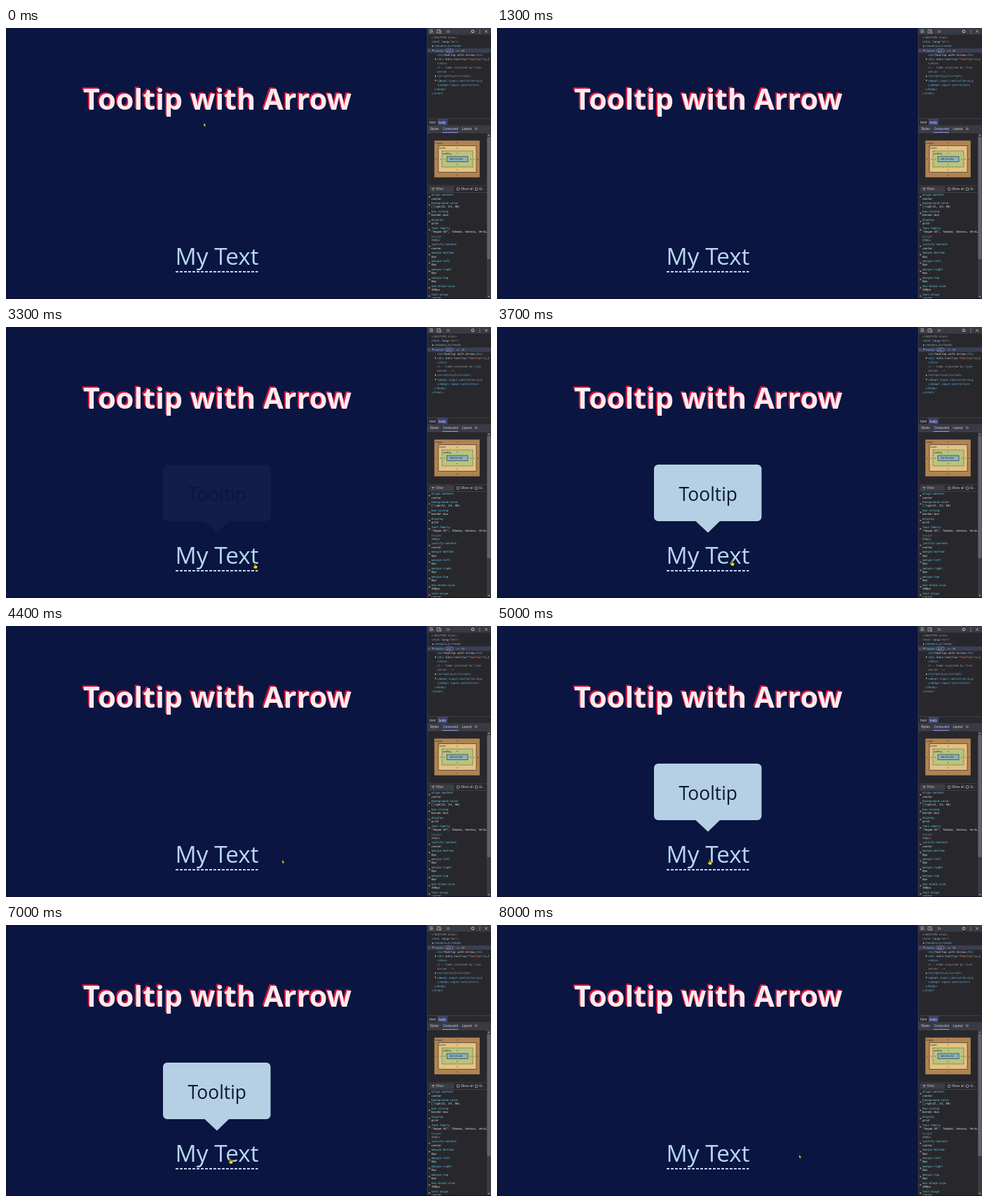
Write an HTML page that moves like this. It is 692 px wide and 388 px high and loops after 9 s.

```html
<!DOCTYPE html>
<html lang="en">
<head>
<meta charset="utf-8">
<title>Tooltip with Arrow</title>
<style>
html, body { margin: 0; width: 100%; height: 100%; overflow: hidden; background: #0a1542; }
svg { display: block; width: 100vw; height: 100vh; }
.page { font-family: "Open Sans", "Noto Sans", sans-serif; }
.title { font-size: 41.5px; font-weight: 700; }
.ui { font: 4.7px Roboto, "Open Sans", sans-serif; }
.mono { font: 4px "DejaVu Sans Mono", "Noto Sans Mono", monospace; white-space: pre; }
.tiny { font: 3.2px Roboto, sans-serif; }
</style>
</head>
<body>
<svg viewBox="0 0 692 388">
  <rect width="692" height="388" fill="#0a1542"/>
  <g class="page">
    <g class="title">
      <text x="108" y="115" fill="#dc143c">Tooltip with Arrow</text>
      <text x="110" y="117" fill="#ffebee">Tooltip with Arrow</text>
    </g>
    <text x="241.500" y="338.5" font-size="33.400" fill="#b9d6ee">My Text</text>
    <path d="M242 349H359.5" stroke="#b9d6ee" stroke-width="1.8" stroke-dasharray="4 2"/>
    <g id="tip" opacity="0">
      <path d="M230 197H371.5a6 6 0 0 1 6 6V272a6 6 0 0 1-6 6H318L301 294.5 283.5 278H230a6 6 0 0 1-6-6V203a6 6 0 0 1 6-6Z" fill="#b5cfe4"/>
      <text x="259.5" y="249" font-size="26.4" fill="#0b1a30">Tooltip</text>
    </g>
  </g>
  <g id="tools">
    <rect x="601" width="91" height="388" fill="#28282c"/>
    <rect x="601" width="91" height="9.5" fill="#3a3a44"/>
    <rect x="601" y="29.3" width="91" height="6.2" fill="#3b3f54"/>
    <rect x="601" y="130" width="91" height="9" fill="#29292e"/>
    <rect x="615.5" y="130" width="14.5" height="9" fill="#3b446c"/>
    <rect x="601" y="139" width="91" height="11" fill="#3a3a44"/>
    <rect x="603.5" y="227" width="36" height="7.5" rx="1.5" fill="#3d3d45"/>
    <path d="M601 129.8H692M601 150H692M601 225.8H692M601 235.5H692" stroke="#505058" stroke-width=".6"/>
    <path d="M622.5 149.5H645" stroke="#8f9be8"/>
    <rect x="686" y="150" width="6" height="238" fill="#3a3a42"/>
    <rect x="686.5" y="156" width="5" height="175" rx="1.5" fill="#62626a"/>
    <path d="M687.5 154.300h3l-1.500-2zM687.500 383.700h3l-1.500 2z" fill="#b0b0b0"/>
    <path d="M601.2 0V388" stroke="#4a4a50" stroke-width=".7"/>
    <g fill="none" stroke="#c7c7c7" stroke-width=".7">
      <path d="M609 2.5H605V7H606.5M607 4.5L610 7.5M607 7V4.5H609.5M615 7V2.5H620M614.5 7H617M618 4H620.5V7.5H618ZM628.5 3L630.5 5 628.5 7M631 3L633 5 631 7M683.2 3L687 6.8M687 3L683.2 6.8M669 142.5L670.5 144.3 669 146M671 142.5L672.5 144.3 671 146"/>
      <circle cx="666" cy="4.8" r="1.9" stroke-width="1"/>
      <rect x="643.3" y="228.8" width="3.6" height="3.6" rx=".6"/>
      <rect x="669.3" y="228.8" width="3.6" height="3.6" rx=".6"/>
      <path d="M607.5 229.5H611.5M608.5 230.8H610.5M609.5 232V233"/>
    </g>
    <path d="M676 2.5V8" stroke="#c7c7c7" stroke-dasharray="1 1.2"/>
    <rect x="627.5" y="30" width="10.5" height="5" rx="2.3" fill="none" stroke="#8ab4f8" stroke-width=".5"/>
    <g id="boxes"></g>
    <g id="labels"></g>
  </g>
  <path d="M0 387.5H692" stroke="#0d1232"/>
  <g id="cursor" stroke="#151515" stroke-width=".7" stroke-linejoin="round">
    <path id="arrow" d="M0-2.5V3.2L1.2 2.2 2.1 4 3 3.5 2.2 1.8H3.8Z" fill="#f2e63a"/>
    <path id="hand" d="M-.8-3.5q.8-.8 1.6 0V-.8L3.2-.2Q4 .2 3.8 1.3L3 4H-.5L-2.6 1.3q-.3-1 .6-.8l1.2.7Z" fill="#ffe600"/>
  </g>
</svg>
<script>
const LOOP = 9000, STEP = 100;
const $ = id => document.getElementById(id);

function add(parent, tag, attrs, text) {
  const el = document.createElementNS('http://www.w3.org/2000/svg', tag);
  for (const k in attrs) el.setAttribute(k, attrs[k]);
  if (text) el.textContent = text;
  parent.append(el);
  return el;
}

// Text made of coloured runs: [color, text, color, text, ...]
function label(x, y, cls, runs) {
  const el = add($('labels'), 'text', { x, y, class: cls });
  for (let i = 0; i < runs.length; i += 2) add(el, 'tspan', { fill: runs[i] }, runs[i + 1]);
}

const TAG = '#6bb5e2', WHITE = '#e8e8e8', GREY = '#a2a2a6', ATTR = '#a8c7fa', VAL = '#fe8d59';

function twisty(x, y, down) {
  const d = down ? `M${x} ${y - 1}h2.4l-1.2 2z` : `M${x} ${y - 1.2}v2.4l2-1.2z`;
  add($('labels'), 'path', { d, fill: '#c7c7c7' });
}

function drawTree() {
  const lines = [
    [607, [GREY, '<!DOCTYPE html>']],
    [607, [TAG, '<html ', ATTR, 'lang', TAG, '="', VAL, 'en', TAG, '">']],
    [611, [TAG, '<head>', WHITE, '(…)', TAG, '</head>'], 1],
    [611, [TAG, '<body>'], 2],
    [615, [TAG, '<h1>', WHITE, 'Tooltip with Arrow', TAG, '</h1>']],
    [615, [TAG, '<div ', ATTR, 'data-tooltip', TAG, '="', VAL, 'Tooltip', TAG, '">', WHITE, '(…)'], 1],
    [615, [TAG, '</div>']],
    [615, [GREY, '<!-- Code injected by live-']],
    [615, [GREY, 'server -->']],
    [615, [TAG, '<script>', WHITE, '(…)', TAG, '<\/script>'], 1],
    [615, [TAG, '<deepl-input-controller>', WHITE, '(…)'], 1],
    [615, [TAG, '</deepl-input-controller>']],
    [611, [TAG, '</body>']],
    [607, [TAG, '</html>']]
  ];
  lines.forEach(([x, runs, mark], i) => {
    const y = 13.8 + i * 6.13;
    label(x, y + 1.4, 'mono', runs);
    if (mark) twisty(x - 3, y, mark === 2);
  });
  label(602.5, 33, 'mono', [GREY, '…']);
  label(629, 33.7, 'tiny', ['#8ab4f8', 'grid']);
  label(640, 33.6, 'mono', [GREY, ' == $0']);
}

function drawBoxModel() {
  const boxes = [
    [611, 161, 65, 53, '#b08354', 'margin'],
    [617, 168.5, 54, 38, '#e3c381', 'border'],
    [622, 176, 44, 23, '#b8c480', 'padding'],
    [629, 184, 30, 7.5, '#88b2bd', '']
  ];
  boxes.forEach(([x, y, width, height, fill, name], i) => {
    add($('boxes'), 'rect', {
      x, y, width, height, fill, stroke: '#222', 'stroke-width': .6,
      'stroke-dasharray': i === 2 || i === 0 ? '1.5 1' : 'none'
    });
    if (!name) return;
    label(x + 1.5, y + 4.8, 'tiny', ['#2b2b2b', name]);
    add($('boxes'), 'path', {
      d: `M642.8 ${y + 3.5}h2M642.8 ${y + height - 3.5}h2M${x + 2} 188h2M${x + width - 4} 188h2`,
      stroke: '#3a3a3a', 'stroke-width': .6
    });
  });
  label(633, 189, 'tiny', ['#1f2b33', '549.531×262']);
}

function drawComputed() {
  const props = [
    ['align-content', 'center'], ['background-color', '  rgb(12, 24, 68)'],
    ['box-sizing', 'border-box'], ['display', 'grid'],
    ['font-family', '"Segoe UI", Tahoma, Geneva, Verd…'], ['height', '360px'],
    ['justify-content', 'center'], ['margin-bottom', '0px'], ['margin-left', '0px'],
    ['margin-right', '0px'], ['margin-top', '0px'], ['min-block-size', '360px'],
    ['text-align', 'center']
  ];
  props.forEach(([name, value], i) => {
    const y = 238.9 + i * 11.86, dim = name === 'height';
    label(607, y + 1.3, 'mono', [dim ? '#5a8fa5' : '#5cd5fb', name]);
    label(607, y + 6.7, 'mono', [dim ? '#a8a8a8' : WHITE, value]);
    if (!dim) twisty(603.5, y + 2.6);
  });
  add($('labels'), 'rect', { x: 607.5, y: 254.5, width: 3, height: 3, fill: '#0c1844', stroke: '#999', 'stroke-width': .4 });
}

function drawTools() {
  drawTree();
  label(604, 136.5, 'ui', ['#c7c7c7', 'html']);
  label(617.5, 136.5, 'ui', ['#d5e0ff', 'body']);
  label(605, 146, 'ui', ['#d0d0d0', 'Styles']);
  label(623.5, 146, 'ui', ['#b4c2f8', 'Computed']);
  label(650.5, 146, 'ui', ['#d0d0d0', 'Layout']);
  drawBoxModel();
  label(613.5, 232.3, 'ui', ['#b8b8b8', 'Filter']);
  label(649, 232.3, 'ui', ['#c7c7c7', 'Show all']);
  label(675, 232.3, 'ui', ['#c7c7c7', 'Gr…']);
  drawComputed();
}

// Each key is [time, value, value, ...]
function track(keys, t) {
  const n = keys.findIndex(k => k[0] > t);
  if (n < 0) return keys[keys.length - 1].slice(1);
  if (n === 0) return keys[0].slice(1);
  const a = keys[n - 1], b = keys[n];
  const u = (t - a[0]) / (b[0] - a[0]), e = u * u * (3 - 2 * u);
  return a.slice(1).map((v, i) => v + (b[i + 1] - v) * e);
}

const path = [
  [0, 282, 138], [100, 282, 138], [800, 313, 80], [1200, 318, -12],
  [2200, 420, -12], [3000, 390, 325], [3300, 355, 342], [3700, 335, 338],
  [4300, 394, 337], [4600, 394, 337], [5000, 303, 338], [5700, 303, 338],
  [6000, 376, 340], [6400, 308, 338], [7000, 320, 338], [7500, 368, 337], [8000, 431, 331]
];
const fade = [
  [3200, 0], [3300, .045], [3600, 1], [4000, 1], [4300, 0],
  [4700, 0], [5000, 1], [5800, 1], [6100, 0],
  [6250, 0], [6400, .46], [6600, 1], [7300, 1], [7600, 0]
];

function draw(t) {
  const [x, y] = track(path, t);
  const over = x > 242 && x < 360 && y > 305;
  $('cursor').setAttribute('transform', `translate(${x} ${y})`);
  $('hand').setAttribute('visibility', over ? 'visible' : 'hidden');
  $('arrow').setAttribute('visibility', over ? 'hidden' : 'visible');
  $('tip').setAttribute('opacity', track(fade, t)[0]);
}

drawTools();
const start = performance.now();
function tick() {
  const t = (performance.now() - start) % LOOP;
  draw(Math.floor(t / STEP) * STEP);
  requestAnimationFrame(tick);
}
tick();
</script>
</body>
</html>
```
